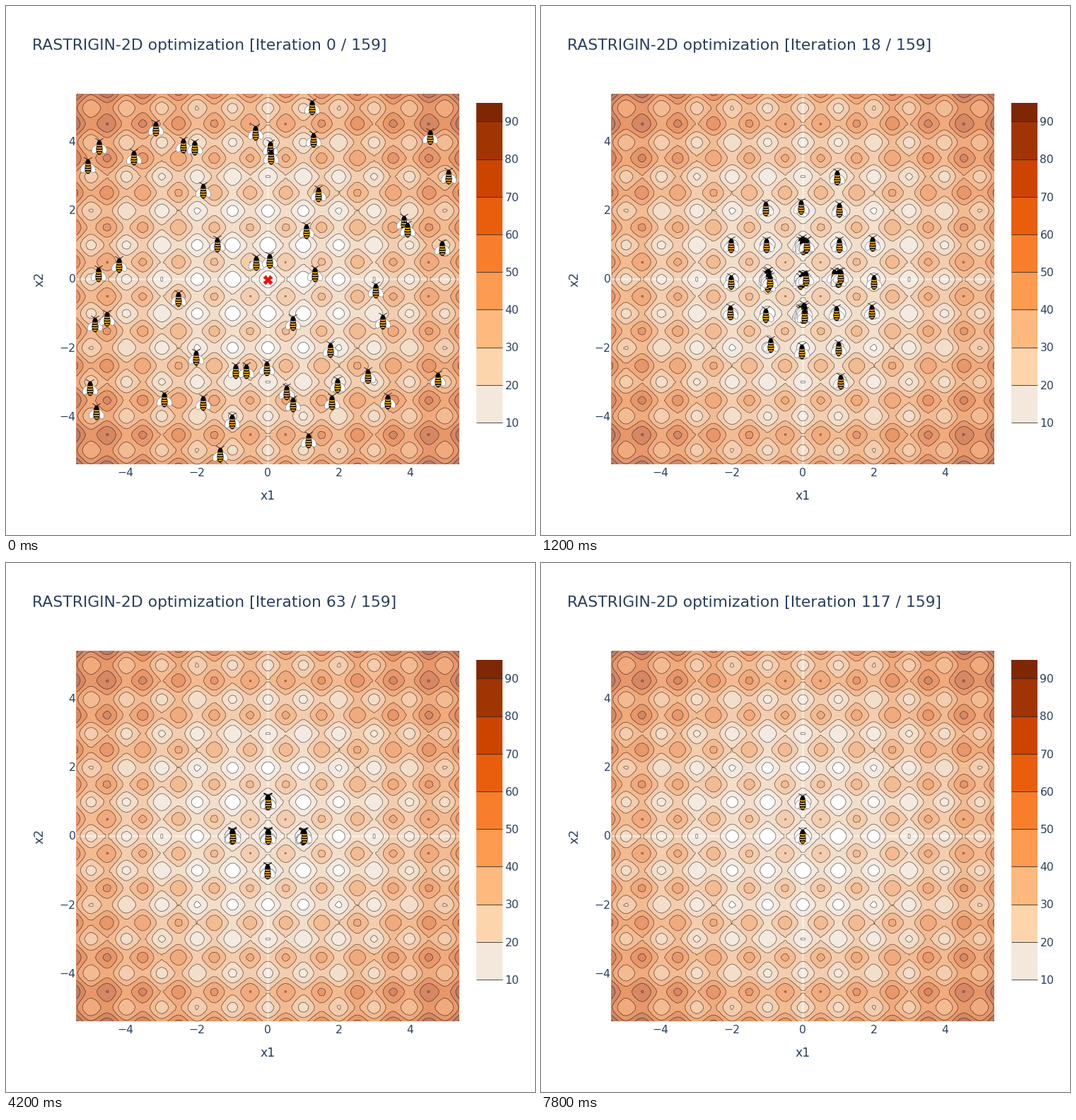
Animation of 748x748 px, one loop 8000 ms. Source, as a matplotlib script:

```python
import numpy as np
import matplotlib.pyplot as plt
from matplotlib.animation import FuncAnimation
from matplotlib.collections import PathCollection
from matplotlib.patches import Rectangle
from matplotlib.path import Path
from matplotlib.transforms import IdentityTransform

SIZE, DPI = 748, 100
FRAMES, INTERVAL, ITER_STEP = 40, 200, 3
PT = 72 / DPI
INK = "#2a3f5f"
CX, CY, SX, SY = 370.4, 386.4, 50.3, 48.65
BOUND = 5.12
LIM = BOUND * 1.05
LEVELS = np.arange(10, 91, 10)
ORANGES = ["#f4e8dc", "#fdd5ac", "#fdb97e", "#fd9b50", "#f87e2c",
           "#e95e0d", "#cd4401", "#a13403", "#7f2704"]

plt.rcParams["font.family"] = "DejaVu Sans"
fig = plt.figure(figsize=(SIZE / DPI, SIZE / DPI), dpi=DPI, facecolor="white")
ax = fig.add_axes([0, 0, 1, 1])
ax.axis("off")


def label(x, y, text, px, **kw):
    return ax.text(x, y, text, fontsize=px * PT, color=INK, **kw)


def rgb(code):
    return np.array([int(code[i:i + 2], 16) for i in (1, 3, 5)]) / 255


def smooth(p):
    """Centripetal spline through the points as a Bezier path."""
    p = p[np.r_[True, np.hypot(*np.diff(p, axis=0).T) > 1e-6]]
    if len(p) < 3:
        return Path(p)
    if np.allclose(p[0], p[-1]):
        q = np.vstack([p[-2], p, p[1]])
    else:
        q = np.vstack([2 * p[0] - p[1], p, 2 * p[-1] - p[-2]])
    d1, d2 = q[:-2] - p, q[2:] - p
    a = np.sqrt(np.hypot(*d1.T))[:, None]
    b = np.sqrt(np.hypot(*d2.T))[:, None]
    num = b ** 2 * d1 - a ** 2 * d2
    back = p + num / (3 * b * (a + b))
    ahead = p - num / (3 * a * (a + b))
    curve = np.stack([ahead[:-1], back[1:], p[1:]], axis=1).reshape(-1, 2)
    codes = [Path.MOVETO] + [Path.CURVE4] * len(curve)
    return Path(np.vstack([p[:1], curve]), codes)


def draw_surface():
    g = np.linspace(-LIM, LIM, 100)
    f = g ** 2 - 10 * np.cos(2 * np.pi * g) + 10
    z = f[:, None] + f[None, :]
    px, py = CX + SX * g, CY - SY * g
    paper = rgb("#e5ecf6")
    base = [rgb("#fee8d2")] + [rgb(c) for c in ORANGES[1:]]
    bands = [(1, 1, 1)] + [tuple(0.6 * c + 0.4 * paper) for c in base]
    ax.contourf(px, py, z, levels=[-1, *LEVELS, 200], colors=bands, zorder=1)
    half_w, half_h = SX * LIM, SY * LIM
    for xs, ys in (([CX - half_w, CX + half_w], [CY, CY]),
                   ([CX, CX], [CY - half_h, CY + half_h])):
        ax.plot(xs, ys, color="white", alpha=0.5, lw=2.6 * PT, zorder=2,
                solid_capstyle="butt", snap=False)
    lines = ax.contour(px, py, z, levels=LEVELS)
    paths = [smooth(np.asarray(s)) for level in lines.allsegs
             for s in level if len(s) > 1]
    lines.remove()
    ax.add_collection(PathCollection(
        paths, sizes=None, transform=ax.transData, facecolors="none",
        edgecolors=(0.06, 0.08, 0.1, 0.6), linewidths=0.75 * PT, zorder=3),
        autolim=False)


def draw_axes():
    for v in (-4, -2, 0, 2, 4):
        text = str(v).replace("-", "\u2212")
        label(98.5, CY - SY * v + 5, text, 15.6, ha="right")
        label(CX + SX * v, 665, text, 15.6, ha="center")
    label(370, 698, "x1", 17.3, ha="center")
    label(48, 386.5, "x2", 17.3, ha="center", va="center", rotation=90)


def draw_colorbar():
    left, right, unit = 665, 702, 5.32
    for v, color in zip(LEVELS, ORANGES):
        y = 589 - (v - 10) * unit
        top = max(y - 10 * unit, 137)
        ax.add_patch(Rectangle((left, top), right - left, y - top,
                               fc=color, ec="none"))
        ax.plot([left, right], [y, y], color="#222222", lw=0.8 * PT,
                solid_capstyle="butt")
        label(705.5, y + 5.7, str(v), 15.6)


def ellipse(cx, cy, rx, ry, tilt=0.0):
    t = np.linspace(0, 2 * np.pi, 25)
    x, y = rx * np.cos(t), ry * np.sin(t)
    c, s = np.cos(tilt), np.sin(tilt)
    return Path(np.c_[cx + c * x - s * y, cy + s * x + c * y], closed=True)


def arc(*pts):
    return Path(pts, [Path.MOVETO, Path.CURVE3, Path.CURVE3])


def bee_parts():
    """Path, face, edge and line width of each part, in pixels, y up."""
    wings = [(ellipse(s * 6, -3.3, 4, 6.6, s * 0.5), "white", "#8f8f96", 0.7)
             for s in (-1, 1)]
    feelers = [(arc((0, 7.5), (s * 2, 10.5), (s * 5.8, 11.6)), "none",
                "#111111", 0.8) for s in (-1, 1)]
    body = [(ellipse(0, y, rx, ry), "black", "none", 0)
            for y, rx, ry in ((-3.4, 4.6, 8.1), (4, 3.7, 4.4), (7, 2.5, 2.5))]
    stripes = [(arc((-w, y), (0, y - 1.2), (w, y)), "none", "#fbac18", 1.8)
               for y, w in ((2, 3.1), (-1.4, 3.8), (-4.8, 3.8), (-8.2, 2.5))]
    return wings + feelers + body + stripes


def disc(r2):
    """Integer minima within a squared radius of the optimum."""
    r = range(-3, 4)
    return [(i, j) for i in r for j in r if i * i + j * j <= r2]


BEES = 50
CROSS = disc(1)
SETTLED = [(0, 1), (1, 1), (-2, 0), (-1, 0), (0, 0), (1, 0), (2, 0),
           (1, -1), (2, -1)]
NO_WEST = [s for s in CROSS if s != (-1, 0)]
BEST = [(0, 0), (0, 1)]

# frame by which the bees hold these minima, and their scatter
STAGES = [(6, disc(5) + [(1, 3), (1, -3)], 0.06), (13, SETTLED, 0.015),
          (18, CROSS, 0.01), (24, CROSS, 0.008), (29, NO_WEST, 0.006),
          (30, NO_WEST, 0.004), (36, BEST, 0.002), (39, BEST, 0)]


def nearest_goals(now, sites, scatter, rng):
    """Fill every site with its closest bee; the rest crowd the centre."""
    sites = np.array(sites, float)
    near = sites[np.hypot(*sites.T) < 1.2]
    spare = near[rng.integers(len(near), size=BEES - len(sites))]
    goal, free = np.empty_like(now), list(range(BEES))
    for site in np.vstack([sites, spare]):
        i = min(free, key=lambda k: np.hypot(*(now[k] - site)))
        free.remove(i)
        goal[i] = site
    return goal + rng.normal(0, 1, goal.shape) * scatter


def swarm():
    """Bee places for every frame; each coordinate jumps once per stage."""
    rng = np.random.default_rng(7)
    now = rng.uniform(-BOUND, BOUND, (BEES, 2))
    track = np.empty((FRAMES, BEES, 2))
    track[0] = now

    def fly(a, b, goal):
        jump = rng.integers(a + 1, b + 1, size=(BEES, 2))
        for k in range(a + 1, b + 1):
            track[k] = np.where(jump <= k, goal, now)

    goal = np.round(0.7 * now) + rng.normal(0, 0.1, now.shape)
    fly(0, 2, goal)
    start, now = 2, goal
    for end, sites, scatter in STAGES:
        goal = nearest_goals(now, sites, scatter, rng)
        fly(start, end, goal)
        start, now = end, goal
    return track


draw_surface()
draw_axes()
draw_colorbar()
ax.plot([CX], [387], marker="X", ms=13.5 * PT, color="red", mec="none",
        zorder=5)
title = label(37.2, 62.3, "", 21.9)
ax.set_xlim(0, SIZE)
ax.set_ylim(SIZE, 0)

track = swarm()
parts = bee_parts()
paths, faces, edges, widths = zip(*parts)
bees = PathCollection(
    paths, sizes=None, facecolors=faces, edgecolors=edges,
    linewidths=[w * PT for w in widths], offsets=[(0, 0)],
    offset_transform=ax.transData, transform=IdentityTransform(), zorder=6)
ax.add_collection(bees, autolim=False)


def update(k):
    title.set_text(f"RASTRIGIN-2D optimization [Iteration {k * ITER_STEP} / 159]")
    spots = np.round((CX, CY) + track[k] * (SX, -SY))
    spots = np.unique(spots, axis=0)  # bees on one pixel show as one
    bees.set_offsets(np.repeat(spots, len(parts), axis=0))
    return title, bees


anim = FuncAnimation(fig, update, frames=FRAMES, interval=INTERVAL,
                     repeat=True, repeat_delay=0)
plt.show()
```
